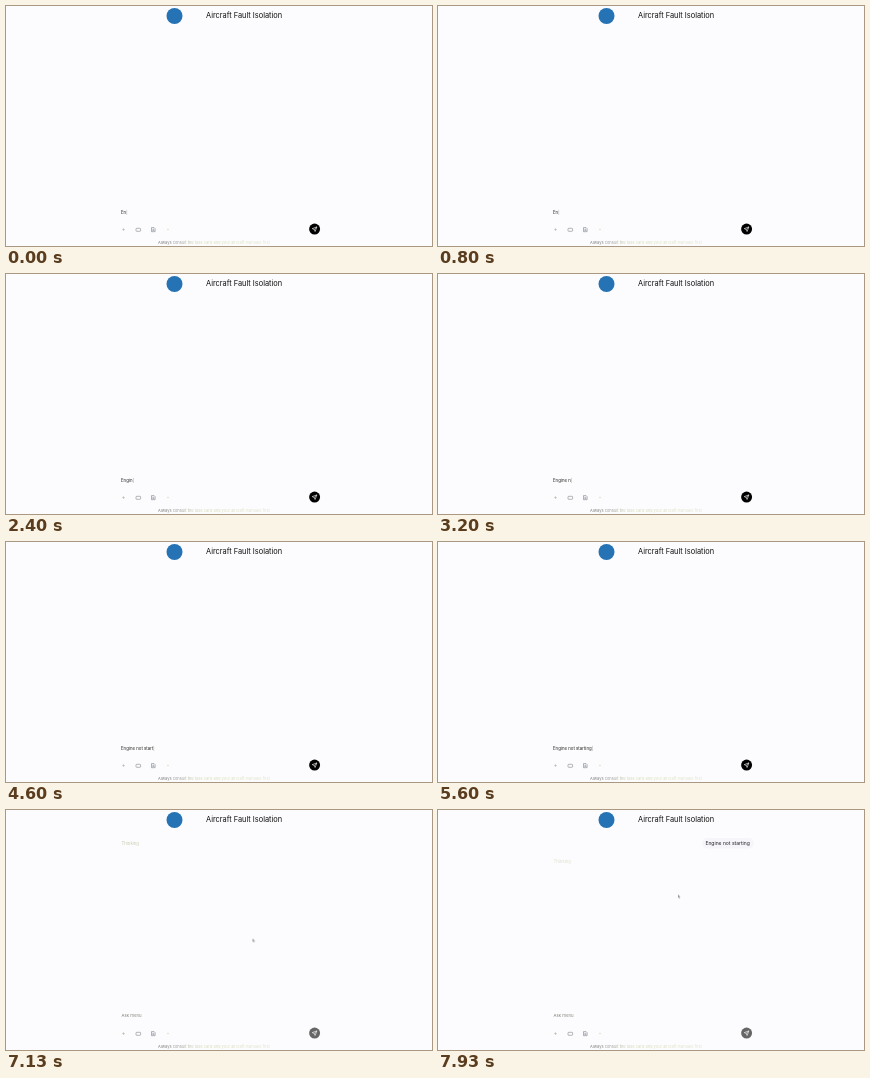
An HTML page that plays this animation: 426x240 px, repeating every 8000 ms.

```html
<!DOCTYPE html>
<html lang="en">
<head>
<meta charset="utf-8">
<title>Aircraft Fault Isolation</title>
<style>
  html, body { margin: 0; width: 100%; height: 100%; overflow: hidden; background: #fcfcfe; }
  svg { display: block; width: 100%; height: 100%; font-family: Inter, Roboto, sans-serif; }
  .draft, .send { animation: before-send 8s step-end infinite; }
  .sent { animation: after-send 8s step-end infinite; }
  .reply { animation: reply 8s step-end infinite; }
  .bubble { animation: bubble 8s step-end infinite; }
  .pointer { animation: pointer 8s linear infinite, pointer-show 8s step-end infinite; }
  .send { animation-name: send; }
  @keyframes before-send { 0% { opacity: 1 } 81.25%, 100% { opacity: 0 } }
  @keyframes after-send { 0% { opacity: 0 } 81.25%, 100% { opacity: 1 } }
  @keyframes send { 0% { fill: #000 } 81.25%, 100% { fill: #666 } }
  @keyframes reply {
    0% { opacity: 0; transform: translateY(0) }
    84% { opacity: .7; transform: translateY(0) }
    92.5%, 100% { opacity: .4; transform: translateY(18px) }
  }
  @keyframes bubble { 0% { opacity: 0 } 92.5%, 100% { opacity: 1 } }
  @keyframes pointer {
    0%, 89.125% { transform: translate(246.5px, 128.5px) }
    99.125%, 100% { transform: translate(240px, 84.5px) }
  }
  @keyframes pointer-show { 0% { opacity: 0 } 86%, 100% { opacity: 1 } }
</style>
</head>
<body>
<svg viewBox="0 0 426 240" preserveAspectRatio="none">
  <defs>
    <linearGradient id="fade">
      <stop offset="0" stop-color="#77777a"/>
      <stop offset=".2" stop-color="#a0a09c"/>
      <stop offset=".34" stop-color="#d8dbb4"/>
      <stop offset="1" stop-color="#e6e6d6"/>
    </linearGradient>
    <clipPath id="field"><rect x="112" y="204.8" width="200" height="5"/></clipPath>
  </defs>

  <circle cx="168.5" cy="10" r="8" fill="#2573b5"/>
  <text x="200" y="11.6" font-size="7.4" fill="#111">Aircraft Fault Isolation</text>

  <g class="bubble">
    <rect x="264" y="28" width="52" height="10.4" rx="5.2" fill="#f6f5fa"/>
    <text x="267.4" y="34.8" font-size="5" fill="#222">Engine not starting</text>
  </g>
  <text class="reply" x="115.5" y="35.3" font-size="4.3" fill="#b5b58a">Thinking</text>

  <text class="draft" x="115" y="207.5" font-size="4.35" fill="#222"><tspan id="typed">En</tspan><tspan fill="#666" font-weight="300">|</tspan></text>
  <g class="sent" clip-path="url(#field)">
    <text x="115.5" y="207.4" font-size="4.3" fill="#88887c">Ask menu</text>
  </g>

  <g fill="none" stroke="#777" stroke-width=".55">
    <path d="M116.2 223.6h2.6m-1.3-1.3v2.6" stroke="#aaa99a"/>
    <rect x="130" y="222.3" width="4.6" height="3" rx=".8"/>
    <path d="M145.5 221.6h2.6l1 1v3.1h-3.6zm.9 1.7h1.8m-1.8 1.2h1.8" stroke="#6d7480"/>
    <circle cx="162" cy="223.6" r=".4" stroke="#cacaa8"/>
  </g>

  <circle class="send" cx="308.6" cy="223.1" r="5.5"/>
  <path d="M310.9 220.9l-4.7 1.7 2 .9 .9 2zl-2.7 2.6" fill="none" stroke="#fff" stroke-width=".6" stroke-linejoin="round"/>

  <text x="152" y="238.2" font-size="4" fill="url(#fade)">Always consult the task card and your aircraft manuals first</text>

  <path class="pointer" d="M0 0v3.4l.8-.7.6 1.3.6-.3-.6-1.2h1.1z" fill="#777" stroke="#eee" stroke-width=".3"/>
</svg>
<script>
  const LOOP = 8000;
  const MESSAGE = "Engine not starting";
  const pace = [[0, 2], [1500, 3], [3150, 8], [4500, 16], [5400, 19], [LOOP, 19]];
  const typed = document.getElementById("typed");
  let start;

  function lettersAt(time) {
    const next = pace.findIndex(([at]) => at > time);
    const [t0, n0] = pace[next - 1];
    const [t1, n1] = pace[next];
    return Math.floor(n0 + (n1 - n0) * (time - t0) / (t1 - t0));
  }

  function draw(now) {
    start ??= now;
    const text = MESSAGE.slice(0, lettersAt((now - start) % LOOP));
    if (typed.textContent !== text) typed.textContent = text;
    requestAnimationFrame(draw);
  }
  requestAnimationFrame(draw);
</script>
</body>
</html>
```
